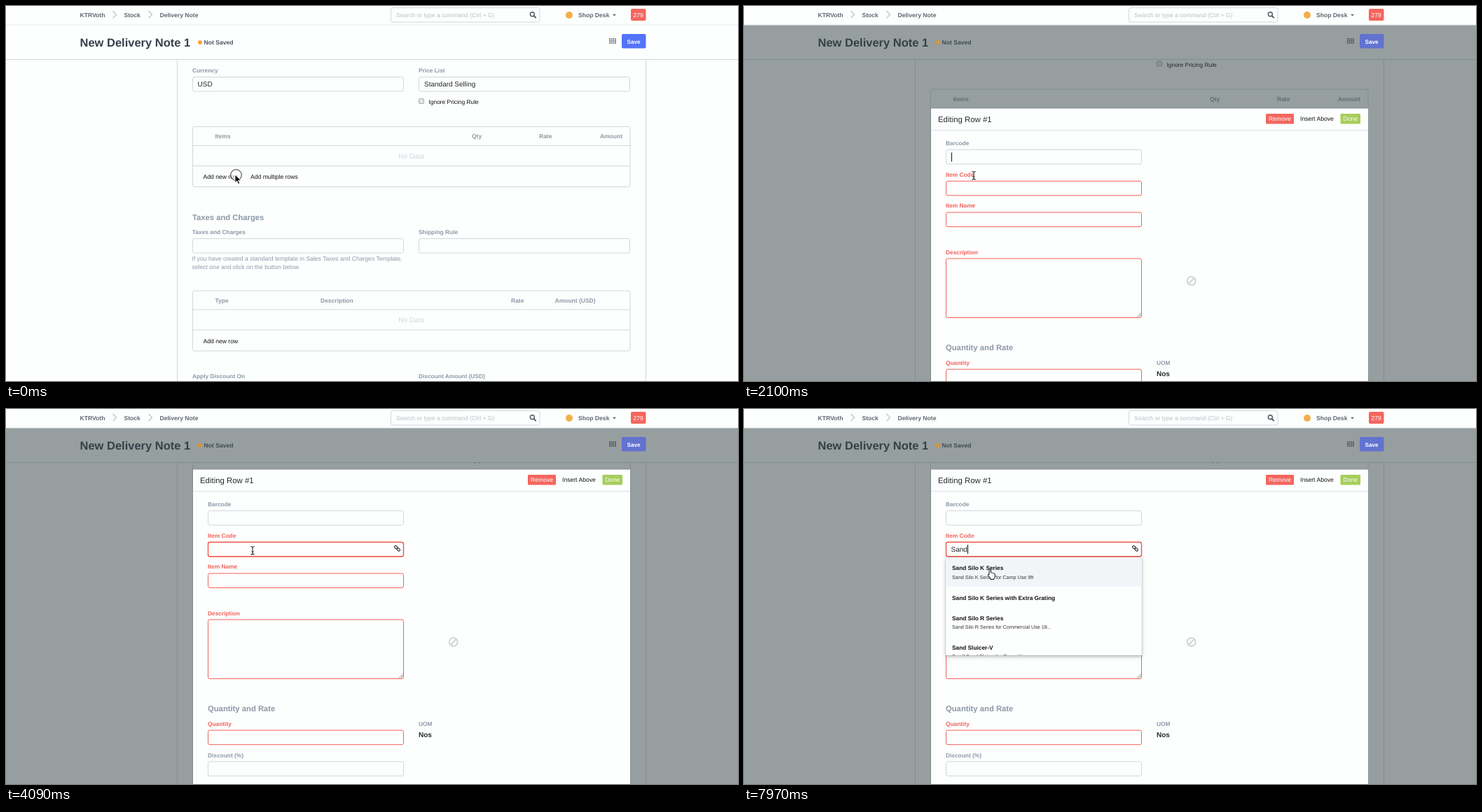
An HTML page that plays this animation: 1045x536 px, repeating every 8 s.

```html
<!DOCTYPE html>
<html lang="en">
<head>
<meta charset="utf-8">
<title>New Delivery Note</title>
<style>
html, body { margin: 0; width: 100%; height: 100%; overflow: hidden; background: #fdfefe; }
svg { display: block; width: 1045px; height: 536px; }
text { font: 8.6px "Liberation Sans", Arial, sans-serif; fill: #111; text-rendering: geometricPrecision; white-space: pre; }
.b { font-weight: bold; }
.label, .head, .title2 { font-weight: bold; fill: #8d99a6; }
.label { font-size: 8.35px; }
.head { font-size: 8.5px; }
.title2 { font-size: 11.25px; }
.must { fill: #f2625a; }
.value { font-size: 10px; fill: #25292e; }
.none { font-size: 10px; fill: #d1d8dd; text-anchor: middle; }
.help { fill: #8d99a6; }
.crumb { font-weight: bold; fill: #5f6871; }
.white { fill: #fff; text-anchor: middle; }
.item { font-size: 8.3px; font-weight: bold; }
.desc { font-size: 7.2px; fill: #333; }
.box, .line { fill: none; stroke: #d1d8dd; }
.box { rx: 2.5px; }
.wide { width: 301px; height: 20.5px; }
.cell { width: 279px; height: 20.5px; }
.req { stroke: #f2625a; }
.paper { fill: #fdfefe; }
.caret { fill: #111; width: 1px; height: 13px; }

/* Every change is a hard step on one shared 8 s clock. */
.a { animation: var(--k) 8s step-end infinite; }
@keyframes scroll {
  0% { transform: none; }
  24.375% { transform: translateY(-9.5px); }
  26.25% { transform: translateY(-53.5px); }
  28.5%, 100% { transform: translateY(-113.5px); }
}
@keyframes shade { 0% { opacity: 0; } 22.5% { opacity: .015; } 24.375% { opacity: .085; } 26.25%, 100% { opacity: .5; } }
@keyframes fade { 0% { opacity: 0; } 22.5% { opacity: .15; } 24.375% { opacity: .65; } 26.25%, 100% { opacity: 1; } }
@keyframes panel { 0% { opacity: 0; } 26.25%, 100% { opacity: 1; } }
@keyframes save { 0% { fill: #5273fa; } 24.375% { fill: #4f6ee6; } 26.25%, 100% { fill: #6272cf; } }
@keyframes dot { 0% { fill: #fca135; } 24.375% { fill: #e5982f; } 26.25%, 100% { fill: #d9962f; } }
@keyframes closed { 0% { visibility: visible; } 22.5%, 100% { visibility: hidden; } }
@keyframes open { 0% { visibility: hidden; } 22.5%, 100% { visibility: visible; } }
@keyframes focus { 0% { visibility: hidden; } 45.5%, 100% { visibility: visible; } }
@keyframes list { 0% { visibility: hidden; } 54.875%, 100% { visibility: visible; } }
@keyframes early { 0% { visibility: hidden; } 54.875% { visibility: visible; } 77.125%, 100% { visibility: hidden; } }
@keyframes late { 0% { visibility: hidden; } 77.125%, 100% { visibility: visible; } }
@keyframes hover { 0% { visibility: hidden; } 97.75%, 100% { visibility: visible; } }
@keyframes beam { 0% { visibility: hidden; } 22.5% { visibility: visible; } 97.75%, 100% { visibility: hidden; } }
@keyframes press {
  0%, 43.625% { visibility: visible; }
  1.875%, 45.5%, 100% { visibility: hidden; }
}
@keyframes blink1 {
  0%, 30.625%, 41.875%, 100% { visibility: hidden; }
  22.5%, 36.25% { visibility: visible; }
}
@keyframes blink2 {
  0%, 51.125%, 62.25%, 84.625%, 95.875% { visibility: hidden; }
  45.5%, 56.625%, 64.125%, 90.25%, 99.625%, 100% { visibility: visible; }
}
@keyframes advance {
  0% { transform: none; }
  64.125% { transform: translateX(7px); }
  67.875% { transform: translateX(12px); }
  69.6875% { transform: translateX(18px); }
  71.5%, 100% { transform: translateX(23px); }
}
@keyframes key1 { 0% { fill-opacity: 0; } 64.125%, 100% { fill-opacity: 1; } }
@keyframes key2 { 0% { fill-opacity: 0; } 67.875%, 100% { fill-opacity: 1; } }
@keyframes key3 { 0% { fill-opacity: 0; } 69.6875%, 100% { fill-opacity: 1; } }
@keyframes key4 { 0% { fill-opacity: 0; } 71.5%, 100% { fill-opacity: 1; } }
@keyframes mouse {
  0% { transform: translate(328px, 242px); }
  38.125% { transform: translate(331px, 237px); }
  40% { transform: translate(338px, 225px); }
  41.875% { transform: translate(347px, 209px); }
  43.625% { transform: translate(352px, 202px); }
  97.75% { transform: translate(352px, 221px); }
  99.625%, 100% { transform: translate(353px, 236px); }
}
</style>
</head>
<body>
<svg viewBox="0 0 1045 536">
  <defs>
    <clipPath id="below"><rect y="77" width="1045" height="459"/></clipPath>
    <clipPath id="menu"><rect x="288" y="212" width="280" height="140"/></clipPath>
    <path id="chevron" d="M0 0l5 5.2-5 5.2" fill="none" stroke="#b4bdc6" stroke-width="1.1"/>
    <path id="grip" d="M0 0l-6 6M0 3l-3 3" fill="none" stroke="#777" stroke-width=".9"/>
  </defs>

  <rect class="paper" width="1045" height="536"/>

  <!-- scrolling form -->
  <g clip-path="url(#below)">
    <path class="line" d="M244.500 70V536M913.500 70V536"/>
    <g class="a" style="--k:scroll">
      <text class="label" x="266" y="95">Currency</text>
      <rect class="box wide" x="266.500" y="101.500"/>
      <text class="value" x="273.500" y="115">USD</text>
      <text class="label" x="589" y="95">Price List</text>
      <rect class="box wide" x="589.500" y="101.500"/>
      <text class="value" x="597" y="115">Standard Selling</text>
      <rect x="589.500" y="132.500" width="7" height="7" rx="1.500" fill="#e4e6e8" stroke="#a9adb1"/>
      <text x="603.500" y="140" font-size="8.400" style="font-size:8.4px">Ignore Pricing Rule</text>

      <text class="head" x="298.500" y="189">Items</text>
      <text class="head" x="665" y="189">Qty</text>
      <text class="head" x="761" y="189">Rate</text>
      <text class="head" x="880" y="189" text-anchor="end">Amount</text>

      <g class="a" style="--k:closed">
        <rect class="box" x="266.500" y="172.500" width="624.500" height="86"/>
        <path class="line" d="M266.500 199.500h624.500M266.500 228.500h624.500"/>
        <text class="none" x="578.500" y="217.500">No Data</text>
        <text x="281.500" y="247">Add new row</text>
        <text x="349" y="247">Add multiple rows</text>

        <text class="title2" x="266" y="305.500">Taxes and Charges</text>
        <text class="label" x="266" y="326">Taxes and Charges</text>
        <rect class="box wide" x="266.500" y="332.500"/>
        <text class="label" x="589" y="326">Shipping Rule</text>
        <rect class="box wide" x="589.500" y="332.500"/>
        <text class="help" x="265.500" y="364">If you have created a standard template in Sales Taxes and Charges Template,</text>
        <text class="help" x="265.500" y="375.500">select one and click on the button below.</text>

        <rect class="box" x="266.500" y="407" width="624.500" height="86"/>
        <path class="line" d="M266.500 434h624.500M266.500 463h624.500"/>
        <text class="head" x="298.500" y="423.500">Type</text>
        <text class="head" x="449" y="423.500">Description</text>
        <text class="head" x="721" y="423.500">Rate</text>
        <text class="head" x="783.500" y="423.500">Amount (USD)</text>
        <text class="none" x="578.500" y="452">No Data</text>
        <text x="281.500" y="481.500">Add new row</text>
        <text class="label" x="266" y="532">Apply Discount On</text>
        <text class="label" x="589" y="532">Discount Amount (USD)</text>
      </g>
      <g class="a" style="--k:open">
        <rect class="box" x="266.500" y="172.500" width="624.500" height="600"/>
        <path class="line" d="M266.500 199.500h624.500"/>
      </g>
    </g>
  </g>

  <!-- page head -->
  <rect class="paper" y="27" width="1045" height="49"/>
  <path class="line" d="M0 76.500H1045"/>
  <text class="b" x="105.500" y="58" style="font-size:16.5px;fill:#36414c">New Delivery Note 1</text>
  <text class="b" x="282.500" y="55" style="fill:#4c5660">Not Saved</text>
  <path d="M861 47.300h10M861 50h10M861 52.700h10" stroke="#6c7680" stroke-width="2" stroke-dasharray="1.900 .8"/>

  <rect class="a" style="--k:shade" y="27" width="1045" height="509" fill="#334143"/>

  <circle class="a" style="--k:dot" cx="277" cy="52" r="2.900"/>
  <rect class="a" style="--k:save" x="879" y="40" width="34.500" height="20.500" rx="2"/>
  <text class="white b" x="896" y="53.500" style="font-size:8.2px">Save</text>

  <!-- row editor -->
  <g clip-path="url(#below)">
    <g class="a" style="--k:scroll">
      <g transform="translate(0 113.500)">
        <rect class="paper a" style="--k:panel" x="267" y="86.500" width="624" height="600"/>
        <g class="a" style="--k:fade">
          <path d="M267 117.500H891" stroke="#dde2e6"/>
          <text x="277" y="106" style="font-size:11.4px;fill:#25292e">Editing Row #1</text>
          <rect x="745" y="94" width="40" height="14.500" rx="1" fill="#f4665e"/>
          <text class="white" x="765" y="104">Remove</text>
          <text x="794" y="104">Insert Above</text>
          <rect x="851.500" y="94" width="28.500" height="14.500" rx="1" fill="#a6ce5b"/>
          <text class="white" x="865.800" y="104">Done</text>

          <text class="label" x="288" y="138.500">Barcode</text>
          <rect class="box cell" x="288.500" y="145.500"/>
          <text class="label must" x="288" y="183.500">Item Code</text>
          <rect class="box cell req" x="288.500" y="190.300"/>
          <text class="label must" x="288" y="228.300">Item Name</text>
          <rect class="box cell req" x="288.500" y="235"/>
          <text class="label must" x="288" y="294.500">Description</text>
          <rect class="box req" x="288.500" y="301" width="279" height="84.500"/>
          <use href="#grip" x="567" y="378.500"/>

          <g fill="none" stroke="#d1d5d9" stroke-width="2">
            <circle cx="638.700" cy="333" r="5.900"/>
            <path d="M634.700 337l8-8"/>
          </g>

          <text class="title2" x="288" y="432">Quantity and Rate</text>
          <text class="label must" x="288" y="452.500">Quantity</text>
          <rect class="box cell req" x="288.500" y="459.200"/>
          <text class="label" x="589" y="452.500">UOM</text>
          <text class="value b" x="589" y="469">Nos</text>
          <text class="label" x="288" y="497.500">Discount (%)</text>
          <rect class="box cell" x="288.500" y="504"/>
        </g>
        <rect class="caret a" style="--k:blink1" x="296" y="149.500"/>
      </g>
    </g>

    <g class="a" style="--k:focus">
      <rect class="box cell" x="288.500" y="190.300" style="stroke:#ee4c40;stroke-width:1.3"/>
      <g fill="none" stroke="#333" stroke-width="1.200">
        <rect x="-2.400" y="-1.600" width="4.800" height="3.200" rx="1.600" transform="translate(556.700 197.600) rotate(45)"/>
        <rect x="-2.400" y="-1.600" width="4.800" height="3.200" rx="1.600" transform="translate(560.300 201) rotate(45)"/>
      </g>
    </g>
    <text class="value" x="295.500" y="204"><tspan class="a" style="--k:key1">S</tspan><tspan class="a" style="--k:key2">a</tspan><tspan class="a" style="--k:key3">n</tspan><tspan class="a" style="--k:key4">d</tspan></text>
    <g class="a" style="--k:advance">
      <rect class="caret a" style="--k:blink2" x="296" y="194"/>
    </g>

    <!-- suggestions -->
    <g class="a" style="--k:list">
      <rect x="288" y="212" width="280" height="140" class="paper" stroke="#000" stroke-opacity=".08" style="filter:drop-shadow(0 2px 2.500px rgba(0,0,0,.28))"/>
      <g clip-path="url(#menu)">
        <rect class="a" style="--k:hover" x="288" y="212" width="280" height="42" fill="#f2f5f8"/>
        <g class="a" style="--k:early">
          <text class="item" x="297" y="230">Sand Silo R Series</text>
          <text class="desc" x="297" y="242.500">Sand Silo R Series for Commercial Use 18...</text>
          <text class="item" x="297" y="272.500">Sand Sluicer-V</text>
          <text class="desc" x="297" y="285">Small Sand Sluicer for Camp Use</text>
          <text class="item" x="297" y="315">Sand Silo K Series</text>
          <text class="desc" x="297" y="327.500">Sand Silo K Series for Camp Use 9ft</text>
        </g>
        <g class="a" style="--k:late">
          <text class="item" x="297" y="230">Sand Silo K Series</text>
          <text class="desc" x="297" y="242.500">Sand Silo K Series for Camp Use 9ft</text>
          <text class="item" x="297" y="272.500">Sand Silo K Series with Extra Grating</text>
          <text class="item" x="297" y="301.500">Sand Silo R Series</text>
          <text class="desc" x="297" y="314">Sand Silo R Series for Commercial Use 18...</text>
          <text class="item" x="297" y="344">Sand Sluicer-V</text>
          <text class="desc" x="297" y="356">Small Sand Sluicer for Camp Use</text>
        </g>
      </g>
    </g>
  </g>

  <!-- navigation bar -->
  <rect class="paper" width="1045" height="27"/>
  <path d="M0 27H1045" stroke="#e6eaec"/>
  <text class="crumb" x="105.500" y="16">KTRVoth</text>
  <use href="#chevron" x="152.500" y="7"/>
  <text class="crumb" x="168.500" y="15.500">Stock</text>
  <use href="#chevron" x="203.500" y="7"/>
  <text class="crumb" x="219.500" y="15.500">Delivery Note</text>
  <rect class="box" x="549.500" y="2.500" width="212.500" height="20.500"/>
  <text x="557" y="16" style="font-size:8.55px;fill:#b9c0c7">Search or type a command (Ctrl + G)</text>
  <g fill="none" stroke="#4c5660" stroke-width="1.400">
    <circle cx="751.300" cy="11.700" r="3"/>
    <path d="M753.500 14l3.200 3.200" stroke-width="1.800"/>
  </g>
  <circle cx="804" cy="13" r="5" fill="#f3ae4b"/>
  <text class="crumb" x="817" y="16">Shop Desk</text>
  <path d="M866 11.700h5l-2.500 2.700z" fill="#5f6871"/>
  <rect x="892" y="4" width="21.500" height="17" rx="2" fill="#f4665e"/>
  <text class="white" x="902.700" y="16">279</text>

  <!-- pointer -->
  <g class="a" style="--k:mouse">
    <circle class="a" style="--k:press" cx=".5" cy="-.5" r="7.800" fill="#fff" fill-opacity=".5" stroke="#222"/>
    <path class="a" style="--k:closed" d="M-1 -1v11.500l2.700-2.500 1.900 4.400 2-.9-1.900-4.200h3.700z" fill="#111" stroke="#fff" stroke-width=".8"/>
    <path class="a" style="--k:beam" d="M-2.800 -5.500q2.300 0 2.800 1.200 .5-1.200 2.800-1.200M0 -4.500V5M-2.800 6q2.300 0 2.800-1.200 .5 1.200 2.800 1.200M-1.500 2h3" fill="none" stroke="#222" stroke-width="1.100"/>
    <path class="a" style="--k:hover" d="M-3 0v-5.500q1.200-1.700 2.400 0v3.500q1.200-.8 2 .4 1.200-.7 2 .5 1.500-.4 1.800 1v3q-.2 1.600-1.200 3v1.600h-5.200v-1.400l-3.700-4.700q0-1.800 1.900-.4z" fill="#fff" stroke="#111" stroke-width="1" stroke-linejoin="round"/>
  </g>
</svg>
</body>
</html>
```
